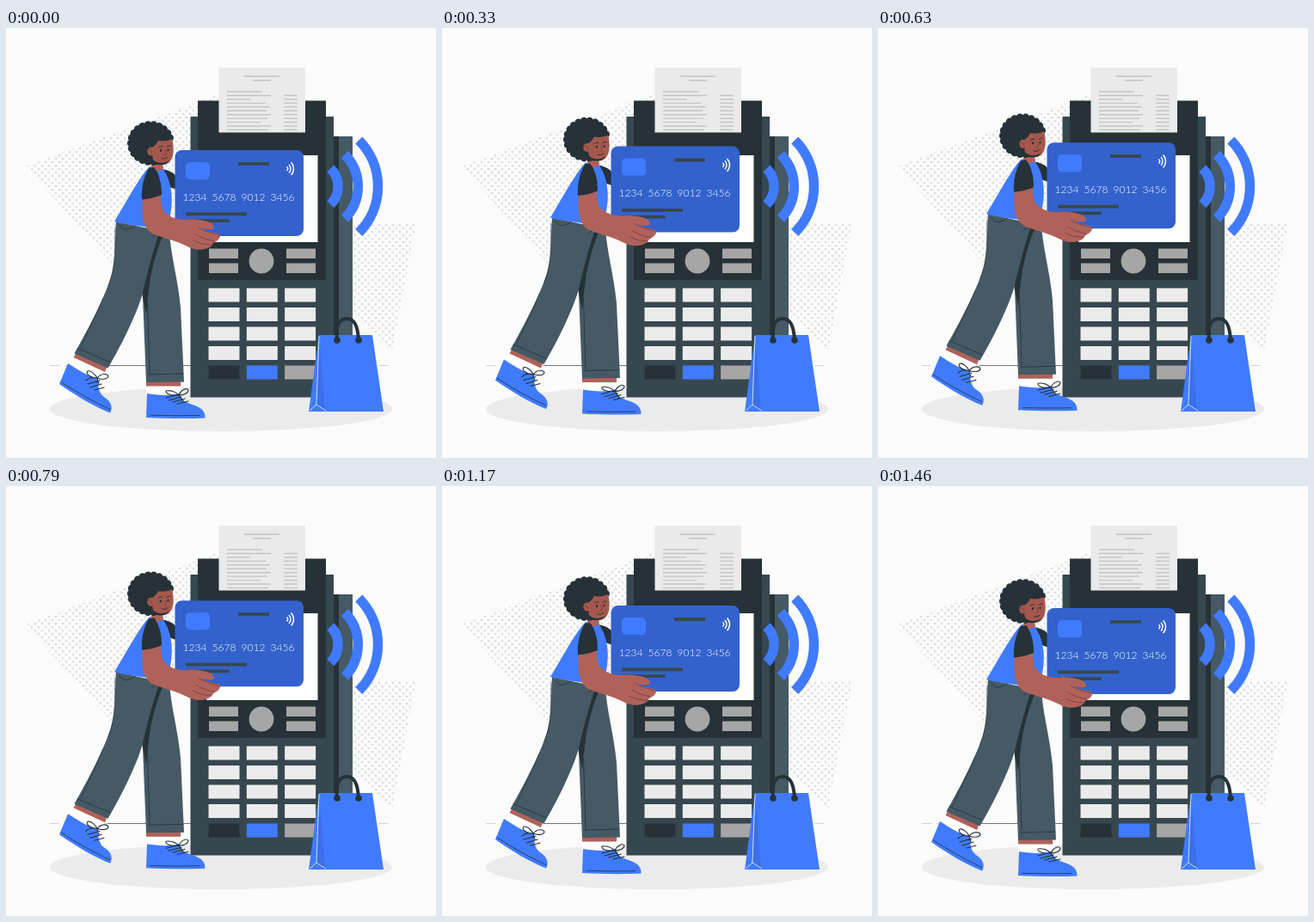
These frames come from a looping animation (500x500 px, 1.5 s). An HTML page with a canvas:

```html
<!DOCTYPE html>
<html lang="en">
<head>
<meta charset="utf-8">
<title>Contactless payment</title>
<style>
html, body { margin: 0; width: 100%; height: 100%; overflow: hidden; background: #fbfbfb; }
canvas { display: block; width: 100vw; height: 100vh; }
</style>
</head>
<body>
<canvas id="stage" width="500" height="500"></canvas>
<script>
const LOOP = 1500, LIFT = 9, LEAD = 40;
const BLUE = '#407bff', CARD = '#3362cc', INK = '#263238', SLATE = '#37474f',
  DENIM = '#455a64', PALE = '#ebebeb', GREY = '#a6a6a6', SKIN = '#b0625a', FACE = '#a5574d';

const stage = document.getElementById('stage').getContext('2d');
const backdrop = document.createElement('canvas');
backdrop.width = backdrop.height = 500;
let c = backdrop.getContext('2d');

function fill(d, color) {
  c.fillStyle = color;
  c.fill(new Path2D(d));
}
function line(d, color = INK, width = 0.8) {
  c.strokeStyle = color;
  c.lineWidth = width;
  c.stroke(new Path2D(d));
}
function box(x1, y1, x2, y2, color, radius = 0) {
  c.fillStyle = color;
  c.beginPath();
  c.roundRect(x1, y1, x2 - x1, y2 - y1, radius);
  c.fill();
}
function oval(x, y, rx, ry, color) {
  c.fillStyle = color;
  c.beginPath();
  c.ellipse(x, y, rx, ry, 0, 0, 7);
  c.fill();
}
function arc(x, y, r, spread, color, width) {
  c.strokeStyle = color;
  c.lineWidth = width;
  c.beginPath();
  c.arc(x, y, r, -spread, spread);
  c.stroke();
}

function halftone(d, x1, y1, x2, y2) {
  c.save();
  c.clip(new Path2D(d));
  for (let y = y1, odd = 0; y < y2; y += 4, odd ^= 1)
    for (let x = x1 + odd * 4; x < x2; x += 8) oval(x, y, 1.5, 1.5, '#e0e0e0');
  c.restore();
}

function drawReceipt() {
  box(247.5, 46, 348, 121.5, '#eaeaea');
  const ink = '#c4c4c4';
  line('M277 56.3H318M287 61H308', ink, 1.5);
  [298, 308, 284, 302, 307, 303, 308, 304, 296, 308, 305].forEach((end, i) => {
    const y = 74 + i * 4.45;
    line(`M257 ${y}H${end}`, ink, 1.4);
    if (i) line(`M323 ${y}H339`, ink, 1.4);
  });
}

function drawTerminal() {
  box(387, 126, 403, 411, DENIM);
  box(380, 126, 387, 411, INK);
  box(214.5, 103, 381, 429.5, SLATE);
  box(223, 84.5, 372, 293, INK);
  box(233, 148, 362.5, 249, '#fff');
  drawReceipt();
  for (const x of [236, 326])
    for (const y of [256.5, 273.5]) box(x, y, x + 34, y + 11.5, GREY);
  oval(297, 271, 14.4, 14.4, GREY);
  const lastRow = [INK, BLUE, GREY];
  for (let row = 0; row < 5; row++)
    for (let col = 0; col < 3; col++) {
      const x = 235.5 + col * 44.3, y = 302.5 + row * 22.5;
      box(x, y, x + 36, y + 16, row < 4 ? PALE : lastRow[col]);
    }
  for (const r of [29.6, 52.8, 76]) arc(356.5, 184.3, r, Math.PI / 4, BLUE, 11.4);
}

function drawBag() {
  fill('M364 357H426L439 446H352Z', BLUE);
  fill('M364 357L361 438L371 446Z', '#3a70e8');
  line('M364 358L361 438L353 445M361 438L372 445', '#dce7ff', 0.9);
  line('M385 363C383 345 388 338 396 338C405 338 409 346 410 363', INK, 4);
  oval(385, 363, 3.8, 3.8, INK);
  oval(410, 363, 3.8, 3.8, INK);
}

function drawBackdrop() {
  c.lineCap = 'butt';
  box(0, 0, 500, 500, '#fbfbfb');
  halftone('M23 161L250 76L200 230L125 276Z', 26, 80, 252, 278);
  halftone('M400 226H477L449 376L400 330Z', 402, 229, 478, 378);
  line('M51 392.5H62M68 392.5H118M403 392.5H430M433 392.5H444', '#c8cacb', 0.8);
  line('M118 392.5H215', '#4b555a', 0.8);
  oval(250, 443, 199, 26, PALE);
  drawTerminal();
  drawBag();
}

function drawShoes() {
  fill('M79 383L115 399L108 412L72 393Z', '#fff');
  fill('M82 377L118 392L115 400L78.5 383Z', SKIN);
  fill('M72 390L62 414C82 428 102 440 121 447.5C125 441 122 434 114 429C107 424 107 414 107 408C94 404 83 397 72 390Z', BLUE);
  line('M64 411.5C84 425 103 435 121 443.5', INK, 0.8);
  line('M93 410C98 405 102 407 107 407M95 414L109 410M98 418L111 414M103 421L114 418M106 407C97 407 92 401 95 399C99 398 104 403 106 407C111 401 118 402 119 405C118 409 111 409 106 407L108 414', INK, 1.1);

  box(163, 414, 203.5, 427, '#fff');
  box(163, 410, 203, 416.5, SKIN);
  fill('M164 425L163 453C186 454.3 215 454.3 231.5 453.5C232 446 227 441 217 438C207 435 203 431 201 425C190 428 176 427 164 425Z', BLUE);
  line('M168 450.3Q196 451.2 225 450.5', INK, 0.8);
  line('M186 430L202 426M189 433L204 429M194 435L208 431M199 437L212 434M201 427C192 428 185 425 186 422C191 421 198 423 201 427C203 421 210 418 212 421C212 425 206 427 201 427L206 434', INK, 1.1);
}

function drawTrousers() {
  fill('M160 236L190 236C191 262 200 292 203 325L207 411.5L163 412L159 312Z', DENIM);
  fill('M174 238L184 238C176 255 171 275 168 290C166 305 164 320 163 333L158 308Z', INK);
  fill('M128 225C126 250 129 276 118 301C108 327 90 360 79.5 378.5L118.5 395.5C134 369 151 335 158.5 310C163 290 170 262 179 236Z', DENIM);
  line('M83 372.5L121 388.5M166 403L206 402M167 402L164.5 320');
  line('M127 232C126 253 129 275 119 300M113 314C104 337 93 357 87 372', INK, 0.6);
  line('M132 229C135 236 143 236 151 229M170 243C174 241 177 239 179 235', INK, 0.8);
}

function drawTorso() {
  fill('M181 164C189 165 194 169 199 174V188L187 184Z', INK);
  fill('M167 161C160 168 155 177 149 186L126 225C142 230 170 231 188 235L192 212C195 192 190 173 182 163Z', BLUE);
  fill('M184 165C191 166 196 169 199 174V190C194 184 188 174 184 165Z', INK);
}

function drawHead() {
  fill('M169 147L169 162C173 167 179 168 183 163L181 152Z', SKIN);
  oval(168, 134, 24.5, 23, INK);
  // The scalloped edge leaves the face side open.
  for (let i = 4; i < 22; i++) {
    const a = i * Math.PI / 11;
    oval(168.4 + 23.2 * Math.cos(a), 134 + 21.7 * Math.sin(a), 4.3, 4.3, INK);
  }
  fill('M169 139C173 138 175 134 177 131C183 132 189 131 193 129C196 140 195 151 190 156C184 161 176 160 171 154Z', FACE);
  oval(168.5, 143.5, 4.2, 5, FACE);
  line('M165.8 142Q168 140 169.5 145', '#703b35', 0.7);
  fill('M170 152C174 157 181 159 190 154C186 160 176 161 170 156Z', INK);
  line('M177 139Q180 136.5 182 138M187 138Q189 136 191 137', INK, 0.9);
  oval(180, 142.5, 1.2, 1.6, INK);
  oval(188.5, 141.8, 1.1, 1.5, INK);
  line('M185 142C186 145 188 148 184 147.8', '#703b35', 0.7);
  line('M181 152Q185 153 188 150.5', INK, 0.9);
}

function drawCard() {
  box(196.5, 142, 346, 242, CARD, 8);
  box(209, 156, 237, 176, BLUE, 4.5);
  box(270, 156, 306, 159.8, SLATE);
  box(209, 214.5, 280, 218.2, SLATE);
  box(209, 222.2, 259.5, 226, SLATE);
  [3.5, 7, 10.5].forEach(r => arc(324, 163.7, r, 0.78, '#fff', 1.4));
  c.fillStyle = '#fff';
  c.font = '300 12px Lato, Inter, sans-serif';
  ['1234', '5678', '9012', '3456'].forEach((digits, i) => c.fillText(digits, 205.5 + i * 34, 200.8));
}

function drawArm() {
  fill('M159 196C157 216 159 233 171 239.5C186 245 200 248 211 254C220 259 231 259 238 254C240 253 240 251 241 250C245 248 249 245 249 242C249 239 243 238 238 237L226 233C232 234 239 235 242 233C243 229 237 225 230 224C221 222 213 222 206 223C196 222 187 218 183 212C180 207 180 201 180 194Z', SKIN);
  line('M224 232C231 237 240 238 247 241M221 240C228 245 235 246 242 248M218 247C225 251 232 252 238 252', '#6e3a35', 0.7);
  fill('M166 163C160 173 157 187 158 199.5C166 199 174 197 181 194C181 180 178 169 172 162Z', INK);
}

function drawShopper() {
  c.lineCap = c.lineJoin = 'round';
  drawShoes();
  drawTrousers();
  drawTorso();
  drawHead();
  c.lineCap = 'butt';
  drawCard();
  c.lineCap = 'round';
  drawArm();
}

drawBackdrop();
c = stage;
const start = performance.now();

function frame() {
  const t = (performance.now() - start) % LOOP;
  const lift = LIFT * (1 - Math.cos(2 * Math.PI * (t + LEAD) / LOOP)) / 2;
  c.drawImage(backdrop, 0, 0);
  c.save();
  c.translate(0, -lift);
  drawShopper();
  c.restore();
  requestAnimationFrame(frame);
}
frame();
</script>
</body>
</html>
```
